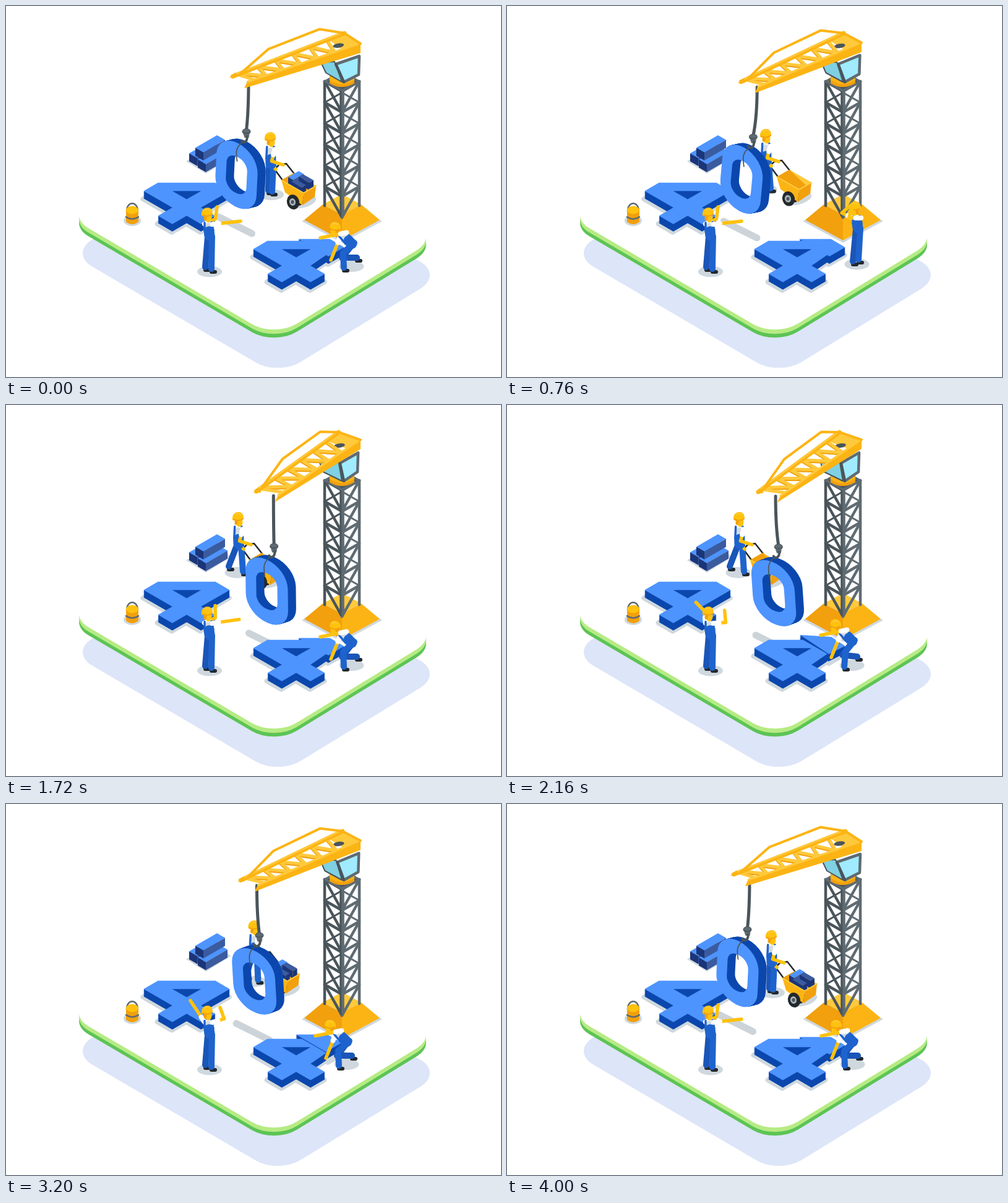
Animation of 800 by 600 pixels, one loop 4.04 s. Source, as an HTML page with a canvas:

```html
<!DOCTYPE html>
<html lang="en">
<head>
<meta charset="utf-8">
<title>404 building site</title>
<style>
html, body { margin: 0; width: 100%; height: 100%; overflow: hidden; background: #fff; }
canvas { display: block; }
</style>
</head>
<body>
<canvas id="stage" width="800" height="600"></canvas>
<script>
const g = document.getElementById('stage').getContext('2d');
const LOOP = 4040, STEP = 40, TAU = Math.PI * 2, SLOPE = .577;
const C = {
  blue: '#4d94ff', navy: '#0b47ad', suit: '#1e63cd', suit2: '#1a55b8', slate: '#3b5b9f', ink: '#1b3579',
  gold: '#fcb414', light: '#ffc93c', amber: '#f2a00d', skin: '#ffc20e',
  steel: '#4a555b', steel2: '#5f6b72', black: '#23282c', ground: '#cfd8de'
};

// numbers and points
const ramp = (t, a, b) => Math.min(1, Math.max(0, (t - a) / (b - a)));
const ease = x => x * x * (3 - 2 * x);
const pulse = (t, a, peak, b) => ease(ramp(t, a, peak)) - ease(ramp(t, peak, b));
const mix = (a, b, k) => a + (b - a) * k;
const blend = (a, b, k) => a.map((v, i) => mix(v, b[i], k));
const add = ([x, y], dx, dy) => [x + dx, y + dy];
const iso = (x, y, a, b) => [x + a - b, y + (a + b) * SLOPE];

// drawing
function trace(pts, close) {
  g.beginPath();
  pts.forEach(p => g.lineTo(...p));
  if (close) g.closePath();
}
function poly(color, ...pts) {
  trace(pts, true);
  g.fillStyle = color;
  g.fill();
}
function line(color, width, ...pts) {
  trace(pts);
  g.strokeStyle = color;
  g.lineWidth = width;
  g.lineCap = g.lineJoin = 'round';
  g.stroke();
}
function curve(d, color, width) {
  g.strokeStyle = color;
  g.lineWidth = width;
  g.lineCap = 'round';
  g.stroke(new Path2D(d));
}
function shape(d, color) {
  g.fillStyle = color;
  g.fill(new Path2D(d));
}
function oval(x, y, rx, ry, color, turn = 0) {
  g.fillStyle = color;
  g.beginPath();
  g.ellipse(x, y, rx, ry, turn, 0, TAU);
  g.fill();
}
function at(x, y, draw) {
  g.save();
  g.translate(x, y);
  draw();
  g.restore();
}
function box(x, y, a, b, h, top, left, right) {
  const back = [x, y], r = iso(x, y, a, 0), l = iso(x, y, 0, b), f = iso(x, y, a, b);
  poly(top, back, r, f, l);
  poly(left, l, f, add(f, 0, h), add(l, 0, h));
  poly(right, r, f, add(f, 0, h), add(r, 0, h));
}

function platform() {
  const slab = (dx, dy, color) => at(363 + dx, 175 + dy, () => {
    g.transform(1, .587, -1, .613, 0, 0);
    g.beginPath();
    g.roundRect(0, 0, 337, 266, 36);
    g.fillStyle = color;
    g.fill();
  });
  slab(6, 62, '#dde5f8');
  slab(0, 13, '#5cc455');
  slab(0, 7, '#b6eb84');
  slab(0, 0, '#fff');
}

function bucket() {
  oval(204, 347, 14, 9, C.ground);
  curve('M195 332C195 315 213 315 213 332', C.steel2, 2.5);
  shape('M194 330V349Q204 357 214 349V330Z', C.amber);
  oval(204, 330, 10, 6.5, C.skin);
  curve('M194 341Q204 348 214 341', C.steel2, 2.5);
}

function pile() {
  const block = (x, y) => box(x, y, 13, 35, 13, C.blue, C.ink, C.slate);
  poly(C.ground, [291, 251], [340, 222], [363, 246], [323, 271]);
  block(331, 218);
  block(345, 228);
  block(341, 209);
}

// the digit 4 on a grid of unit squares
const UNIT = 23.2;
const STEM = [[3, 2], [4, 2], [4, 3], [3, 3], [3, 4], [2, 4], [2, 3], [0, 3], [0, 2]];
const FOUR = [[2, 0], [3, 0], ...STEM];
const LOWER = [[1.2, .8], [2.9, .8], ...STEM];
const UPPER = [[.9, 1.1], [2, 0], [3, 0], [3, 1.1]];
const HOLE = [[1, 2], [2, 2], [2, 1]];

const tiles = cells => cells.map(([a, b]) => iso(0, 0, a * UNIT, b * UNIT));
function digit(x, y, cells) {
  const pts = tiles(cells);
  for (let i = 12; i > 0; i--) at(x, y + i, () => poly(C.navy, ...pts));
  at(x, y, () => poly(C.blue, ...pts));
}
function footprint(x, y, cells) {
  const pts = tiles(cells);
  at(x - 1, y + 13, () => {
    line(C.ground, 8, ...pts, pts[0]);
    poly(C.ground, ...pts);
  });
}
const hole = (x, y) => at(x, y, () => poly(C.navy, ...tiles(HOLE)));

function leftFour() {
  footprint(292, 259, FOUR);
  digit(292, 259, FOUR);
  hole(292, 259);
}
function rightFour(heave, push) {
  footprint(469, 353, LOWER);
  footprint(477, 350, UPPER);
  at(547 - 4 * push, 390 - 4 * push - heave, () => {
    g.rotate(.13 * heave);
    digit(-70, -40, UPPER);
  });
  digit(469, 353, LOWER);
  hole(469, 353);
}

function tower() {
  const X = 543, corners = (y, r) => [[X - r, y], [X, y + r * .54], [X + r, y], [X, y - r * .54]];
  const base = corners(346, 61), top = corners(321, 31);
  poly(C.ground, ...corners(348, 65));
  poly(C.amber, base[0], base[1], top[1], top[0]);
  poly(C.gold, base[2], base[1], top[1], top[2]);
  poly(C.light, ...top);
  line(C.steel, 4, [X, 110], [X, 305]);
  for (let y = 122; y < 320; y += 34) {
    for (const [side, color] of [[-28, C.steel], [28, C.steel2]]) {
      const outer = [X + side, y], front = [X, y + 16];
      line(color, 3, [X, y - 16], outer);
      line(color, 4.5, outer, front);
      line(color, 4.5, outer, add(front, 0, 34));
    }
  }
  for (const [x, y, color] of [[-28, 122, C.steel], [28, 122, C.steel2], [-1.5, 138, C.steel], [1.5, 138, C.steel2]]) {
    line(color, 4.5, [X + x, y], [X + x, y + 201]);
  }
  poly(C.steel2, ...corners(122, 31));
  poly(C.steel, ...corners(122, 23));
}

function cab(p) {
  shape('M523 113V125Q542 137 563 125V113Z', C.amber);
  curve('M526 118Q542 129 560 118', C.gold, 6);
  const edge = 533 + 7 * p, foot = [546, 123];
  const left = [[509 - 3 * p, 91], [edge - 2, 90 + 3 * p], add(foot, -3, 0), [517 - 5 * p, 108]];
  const right = [[edge, 94], [571 - 2 * p, 81 - 4 * p], [570 - 2 * p, 111 - 3 * p], foot];
  poly('#7fd0e3', ...left);
  line(C.steel, 2, ...left, left[0]);
  poly('#a0ebff', ...right);
  line(C.steel2, 4.5, ...right, right[0]);
  line(C.steel, 4, right[0], foot);
}

function boomFrame(p) {
  const kx = p * (6 + p) / 7;
  const corner = (x0, y0, x1, y1) => [mix(x0, x1, kx), mix(y0, y1, p)];
  const tip = corner(361, 116, 403, 144), nose = corner(385, 133, 438, 158);
  const end = corner(547, 44, 537, 44), heel = corner(573, 61, 573, 56);
  return {
    tip, nose, end, heel,
    far: u => blend(tip, end, u),
    near: u => blend(add(nose, 4, -9), heel, u)
  };
}
function boom({ tip, nose, end, heel, far, near }) {
  poly(C.light, far(.86), end, heel, near(.84));
  const slot = blend(far(.88), near(.84), .45);
  oval(slot[0] + 4, slot[1] + 3, 9, 3.5, C.steel, -.15);
  const zig = Array.from({ length: 11 }, (_, i) => (i % 2 ? near : far)(.1 + .075 * i));
  line(C.amber, 5, ...zig.map(q => add(q, 0, 2)));
  line(C.light, 5, ...zig);
  line(C.light, 5, far(.07), near(.07));
  line(C.gold, 7, far(.03), end);
  line(C.light, 2.5, add(far(.06), 0, -2), add(end, 0, -2));
  poly(C.gold, tip, add(tip, 10, -9), add(tip, 12, -1));
  poly(C.gold, nose, near(0), heel, add(heel, 0, 15));
  line(C.light, 3.5, add(near(.01), 0, -1), add(near(.97), 0, -1));
  line(C.gold, 4, end, heel);
  line(C.gold, 4, far(.1), add(far(.34), 0, -22), add(far(.785), 0, -22), end);
}

function zero(x, y, turn) {
  const ring = new Path2D();
  ring.roundRect(-34, -51, 68, 102, 33);
  ring.roundRect(-17, -29, 34, 58, 16);
  at(x, y, () => {
    g.rotate(turn);
    for (let i = 14; i >= 0; i--) at(i * .93, i * -.28, () => {
      g.transform(1, .45, 0, 1, 0, 0);
      g.fillStyle = i ? C.navy : C.blue;
      g.fill(ring, 'evenodd');
    });
  });
}
function rope([x, y], hx, hy) {
  curve(`M${x} ${y}Q${x} ${(y + hy) / 2 + 8} ${hx} ${hy - 2}`, C.steel, 5);
}
function hook(x, y) {
  at(x, y, () => {
    oval(0, 0, 7, 5, C.steel);
    oval(0, -1, 6, 3, C.steel2);
    shape('M-5 4H5L4 10H-3Z', C.steel2);
    curve('M1 8C2 17 -5 20 -8 15', C.steel, 4);
    curve('M-6 17C-18 26 -17 34 -15 48', C.steel, 1.7);
  });
}

// elbow or knee between two ends of a limb
function limb(from, to, length, bend) {
  const dx = to[0] - from[0], dy = to[1] - from[1], d = Math.hypot(dx, dy);
  const out = bend * Math.sqrt(Math.max(0, length * length - d * d)) / 2 / d;
  return [from, add(blend(from, to, .5), -dy * out, dx * out), to];
}
function arm(shoulder, hand, bend) {
  const pts = limb(shoulder, hand, 39, bend);
  line(C.skin, 5.5, ...pts);
  line('#fff', 8, shoulder, blend(shoulder, pts[1], .45));
}
function worker({ head, hip, feet, hands, bends = [1, 1], knee = 0, face = 1 }) {
  const along = k => blend(head, hip, k);
  const size = Math.hypot(hip[0] - head[0], hip[1] - head[1]);
  const nx = (hip[1] - head[1]) / size, ny = (head[0] - hip[0]) / size;
  const beside = (k, w) => add(along(k), nx * w, ny * w);
  const neck = 17 / size;
  const middle = blend(feet[0], feet[1], .5);

  oval(middle[0] + 2, middle[1] + 1, 20, 9, C.ground);
  feet.forEach((foot, i) => {
    line(C.black, 6, foot, add(foot, 6, 0));
    line(i ? C.suit : C.suit2, 10, ...limb(beside(1, i * 7 - 3), add(foot, 0, -5), 48, knee));
  });
  arm(beside(neck, -6), hands[0], bends[0]);
  line('#fff', 15, along(neck + .1), along(.8));
  line('#d3dce4', 9, along(neck + .08), along(.6));
  line(C.suit, 17, along(.78), along(.95));
  for (const w of [-7, 7]) line(C.suit, 3.5, beside(neck - .05, w * .8), beside(.75, w));
  oval(head[0] + 2 * face, head[1] + 7, 5.5, 8, C.skin);
  oval(head[0] - 3 * face, head[1] + 8, 2.5, 4, C.amber);
  at(...head, () => {
    g.scale(face, 1);
    shape('M-9 4C-10 -5 -5 -9 1 -9C7 -9 9 -4 9 2Q1 8 -9 4Z', C.skin);
    curve('M-7 3Q1 7 8 2', C.amber, 2);
    curve('M-4 -5Q1 -8 5 -5', C.light, 2);
  });
  arm(beside(neck + .05, 7), hands[1], bends[1]);
}

function guide(wave) {
  worker({
    head: [325, 335], hip: [329, 373], feet: [[322, 427], [332, 430]],
    hands: [blend([341, 325], [298, 318], wave), blend([379, 348], [346, 329], wave)]
  });
}

function pusher(k) {
  const stride = Math.abs(Math.sin(k * Math.PI * 2.5));
  line(C.black, 2.5, [448, 283], [434, 264], [441, 257], [453, 255], [468, 274]);
  worker({
    head: [427, 213], hip: [428, 258],
    feet: [[424 - 12 * stride, 303 - 6 * stride], [430 + 5 * stride, 305]],
    hands: [[436, 264], [448, 257]], bends: [1, 1]
  });
}

function cart(load) {
  oval(481, 317, 21, 9, C.ground, -.3);
  oval(473, 313, 9, 10, C.black);
  box(465, 270, 36, 20, 0, C.amber, C.amber, C.amber);
  poly(C.light, [465, 270], iso(465, 270, 36, 0), iso(465, 276, 34, 4));
  g.globalAlpha = load;
  box(473, 267, 8, 17, 12, C.blue, C.ink, C.slate);
  box(480, 272, 17, 7, 12, C.slate, C.ink, C.ink);
  box(468, 280, 17, 7, 12, C.slate, C.ink, C.ink);
  g.globalAlpha = 1;
  const left = iso(465, 270, 0, 20), front = iso(465, 270, 36, 20), right = iso(465, 270, 36, 0);
  poly(C.gold, left, front, add(front, -2, 20), add(left, 6, 20));
  poly(C.amber, right, front, add(front, -2, 20), add(right, -2, 18));
  line(C.light, 2, left, front, right);
  oval(464, 317, 10, 12, C.black, -.25);
  oval(463, 317, 5, 6, '#aab4bb', -.25);
  oval(463, 317, 2.5, 3, C.steel);
}

function lifter(heave, push) {
  const dx = -2 * heave - 8 * push, dy = -6 * heave;
  const body = (x, y) => [x + dx, y + dy];
  worker({
    head: body(532, 358), hip: body(560, 386),
    feet: [[567 + dx, 412], [546 + dx, 428]],
    hands: [body(525, 411), body(508, 375)], bends: [1, -1], knee: 1, face: -1
  });
}
function wiper() {
  worker({
    head: [563, 325], hip: [567, 360], feet: [[559, 418], [568, 415]],
    hands: [[556, 322], [558, 324]], bends: [-1, -1], face: -1
  });
}

function render(t) {
  const phase = t / 4000 * TAU;
  const p = ease(1 - Math.abs(1 - t / 2000));
  const frame = boomFrame(p);
  const tilt = .078 * Math.sin(phase) + .05 * Math.cos(phase);
  const hang = add(frame.nose, 7 - 10 * p, -10);
  const hx = hang[0] - 70 * tilt, hy = 203 + 27 * p;
  const zx = hx - 12.5 - 70 * tilt, zy = hy + 72 - 40 * tilt;
  const trip = ramp(t, 560, 1720) - ramp(t, 2640, 3780);
  const load = 1 - ramp(t, 400, 600) + ramp(t, 2400, 2640);
  const wave = ease(ramp(t, 1600, 2360)) - ease(ramp(t, 3240, 3800));
  const heave = pulse(t, 1760, 2600, 3200), push = pulse(t, 2400, 3200, 4000);

  g.fillStyle = '#fff';
  g.fillRect(0, 0, 800, 600);
  platform();
  bucket();
  pile();
  leftFour();
  line('rgba(91,114,130,.3)', 11, [zx - 29, zy + 68], [zx + 25, zy + 95]);
  rightFour(heave, push);
  at(-52 * trip, -31 * trip, () => {
    pusher(trip);
    cart(load);
  });
  tower();
  cab(p);
  zero(zx, zy, tilt);
  rope(hang, hx, hy);
  hook(hx, hy);
  boom(frame);
  guide(wave);
  if (t >= 600 && t < 1440) wiper();
  else lifter(heave, push);
}

let start;
function tick(now) {
  start ??= now;
  render(Math.floor((now - start) % LOOP / STEP) * STEP);
  requestAnimationFrame(tick);
}
render(0);
requestAnimationFrame(tick);
</script>
</body>
</html>
```
